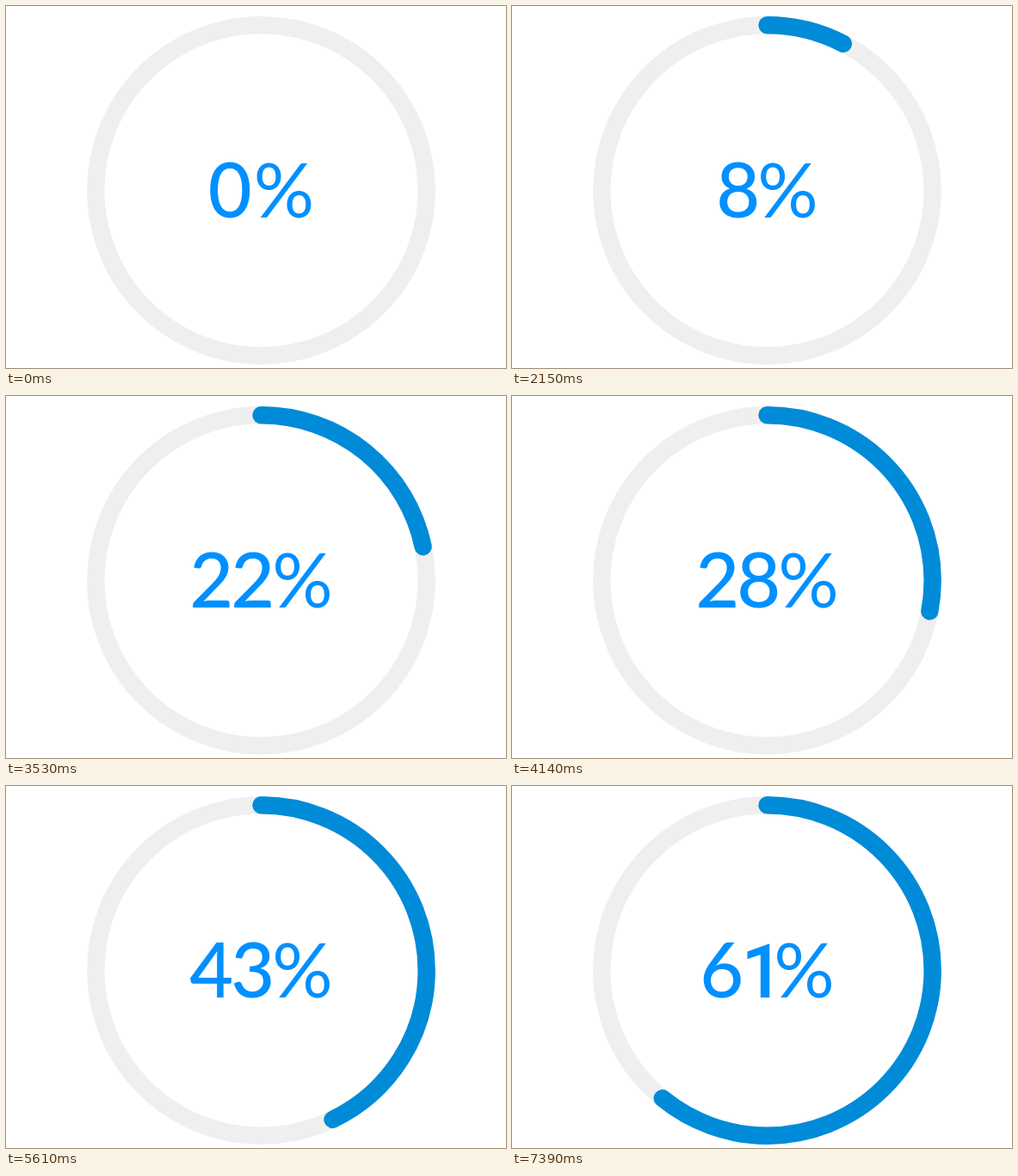
Recreate the animation shown at these times as an HTML page. Size 581 px wide and 421 px high, loop 7460 ms.

```html
<!DOCTYPE html>
<html lang="en">
<head>
<meta charset="utf-8">
<title>Circular progress</title>
<style>
  html, body { margin: 0; width: 100%; height: 100%; overflow: hidden; background: #fff; }
  svg { display: block; width: 581px; height: 421px; }
  circle { fill: none; stroke-width: 20.4; }
  .track { stroke: #efefef; }
  .bar { stroke: #008bd9; stroke-linecap: round; }
  text { font: 500 88px Lato, sans-serif; fill: #0090ff; text-anchor: middle; letter-spacing: -3px; }
  .zero { letter-spacing: 2px; }
  .one { font-family: Roboto, sans-serif; letter-spacing: -12px; }
  .unit { font-weight: 400; letter-spacing: 0; }
</style>
</head>
<body>
<svg viewBox="0 0 581 421">
  <circle class="track" cx="296.5" cy="214.5" r="192.2"/>
  <circle class="bar" cx="296.5" cy="214.5" r="192.2" pathLength="100" transform="rotate(-90 296.5 214.5)"/>
  <text x="296.5" y="246"></text>
</svg>
<script>
const LOOP = 7460, START = 1460, STEPS = 78;
const bar = document.querySelector('.bar');
const label = document.querySelector('text');
let shown;

// Step times snap to 10 ms; the middle stretch runs one tick early.
function stepTime(i) {
  const early = i >= 19 && i < 55 ? 10 : 0;
  return START + Math.floor((77 * i + 4 - early) / 10) * 10;
}

function stepAt(time) {
  let i = -1;
  while (i + 1 < STEPS && time >= stepTime(i + 1)) i++;
  return i;
}

function glyph(char) {
  const kind = { 0: 'zero', 1: 'one', '%': 'unit' }[char] || '';
  return `<tspan class="${kind}">${char}</tspan>`;
}

function draw(step) {
  const percent = step < 0 ? 0 : 0.55 + 0.784 * step;
  bar.style.visibility = step < 0 ? 'hidden' : 'visible';
  bar.setAttribute('stroke-dasharray', `${percent} 100`);
  label.innerHTML = [...`${Math.round(percent)}%`].map(glyph).join('');
}

const origin = performance.now();
function tick() {
  const step = stepAt((performance.now() - origin) % LOOP);
  if (step !== shown) draw(shown = step);
  requestAnimationFrame(tick);
}
tick();
</script>
</body>
</html>
```
